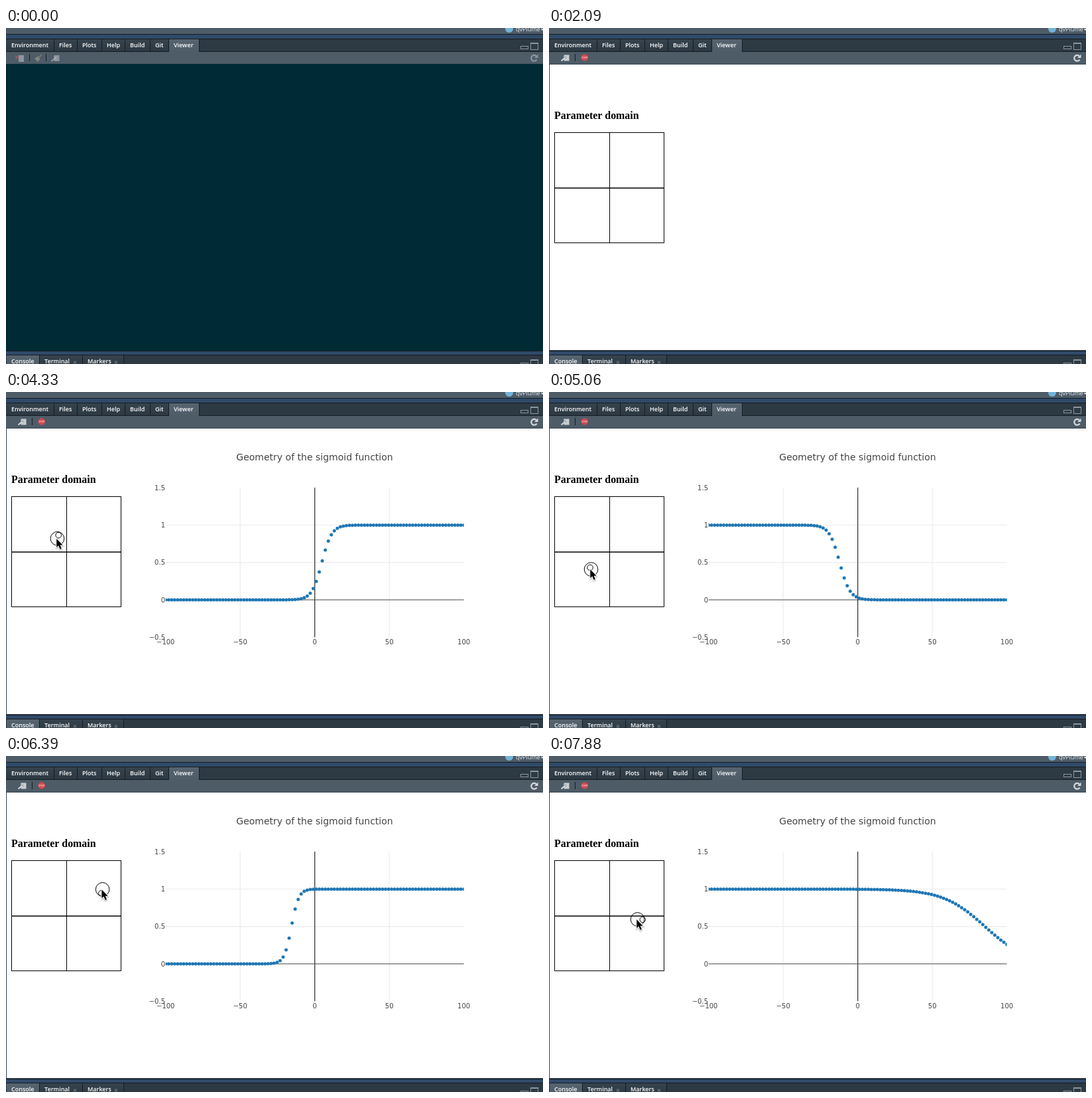
An HTML page with a canvas for the animation above (8000 ms loop, 810 by 506 pixels).

```html
<!DOCTYPE html>
<html lang="en">
<head>
<meta charset="utf-8">
<title>Sigmoid viewer</title>
<style>
html, body { margin: 0; width: 100%; height: 100%; overflow: hidden; background: #002b36; }
canvas { display: block; width: 810px; height: 506px; }
</style>
</head>
<body>
<canvas id="stage" width="810" height="506"></canvas>
<script>
const ctx = document.getElementById('stage').getContext('2d');
const LOOP = 8000, LAG = 75;
const UI = '"Open Sans", "Noto Sans", sans-serif';
const CHART = '"DejaVu Sans", sans-serif';
const BAR = '#4e5c68', STRIP = '#2d3943', FRAME = '#304a69', EDGE = '#141c23';
const INK = '#444', ICON = '#8b969f', BRIGHT = '#d5dadd';

// Turning points of the pointer: time, x, y
const route = [
  [2680, 88.5, 478], [3130, 80.5, 212], [4200, 80.5, 212],
  [4985, 62, 264.4], [5060, 63.5, 267], [5360, 88, 278],
  [5865, 130.2, 244.8], [5940, 135.5, 235], [6540, 149, 189.5],
  [7055, 158.2, 214.3], [7130, 162.5, 218], [7400, 168, 238],
  [7805, 141.3, 246.4], [7880, 133.5, 246]
];

function pointer(t) {
  const i = Math.max(1, route.findIndex(p => p[0] >= t));
  const [t0, x0, y0] = route[i - 1], [t1, x1, y1] = route[i];
  const k = (t - t0) / (t1 - t0);
  return { x: x0 + (x1 - x0) * k, y: y0 + (y1 - y0) * k };
}

// The screen refreshes every 150 ms, now and then 10 ms sooner
const tick = n => 4330 + 150 * n - 10 * (Math.min(4, Math.floor((n + 1) / 3)) + (n > 17));

function snap(t) {
  if (t < 4330) return Math.min(3130, 2680 + 150 * Math.floor((t - 2680) / 150));
  let n = 24;
  while (tick(n) > t) n--;
  return tick(n);
}

function rect(x, y, w, h, color) {
  ctx.fillStyle = color;
  ctx.fillRect(x, y, w, h);
}

function box(x, y, w, h, color) {
  ctx.strokeStyle = color;
  ctx.lineWidth = 1;
  ctx.strokeRect(x + .5, y + .5, w - 1, h - 1);
}

function line(x1, y1, x2, y2, color, width = 1) {
  ctx.strokeStyle = color;
  ctx.lineWidth = width;
  ctx.beginPath();
  ctx.moveTo(x1, y1);
  ctx.lineTo(x2, y2);
  ctx.stroke();
}

function cross(x, y, r, color, width) {
  line(x - r, y - r, x + r, y + r, color, width);
  line(x - r, y + r, x + r, y - r, color, width);
}

function text(str, x, y, font, color, align = 'left') {
  ctx.font = font;
  ctx.fillStyle = color;
  ctx.textAlign = align;
  ctx.fillText(str, x, y);
}

function trace(points) {
  ctx.beginPath();
  points.forEach(([x, y]) => ctx.lineTo(x, y));
  ctx.closePath();
}

function poly(points, color) {
  trace(points);
  ctx.fillStyle = color;
  ctx.fill();
}

function disc(x, y, r, color) {
  ctx.beginPath();
  ctx.arc(x, y, r, 0, 7);
  ctx.fillStyle = color;
  ctx.fill();
}

function arc(x, y, r, from, to, color, width = 1) {
  ctx.beginPath();
  ctx.arc(x, y, r, from, to);
  ctx.strokeStyle = color;
  ctx.lineWidth = width;
  ctx.stroke();
}

function tabs(labels, active, y, closable) {
  const font = '600 9px ' + UI;
  let x = 1;
  for (const label of labels) {
    const on = label === active, close = closable && !on;
    ctx.font = font;
    const end = x + ctx.measureText(label).width + (close ? 26.6 : 15.6);
    const left = Math.round(x), right = Math.round(end) - 1;
    const shade = ctx.createLinearGradient(0, y, 0, y + 19);
    shade.addColorStop(0, on ? '#566470' : '#36434d');
    shade.addColorStop(1, on ? BAR : '#2c3842');
    rect(left, y, right - left, on ? 20 : 18, shade);
    line(right + .5, y, right + .5, y + 19, EDGE);
    text(label, left + 7, y + 12, font, '#fff');
    if (close) cross(right - 11, y + 10.5, 2, '#66717a', 1.3);
    x = end;
  }
}

function paneButtons(y) {
  box(776, y + 5, 12, 5, ICON);
  box(791, y, 12, 11, ICON);
  rect(791, y, 12, 2, ICON);
}

function popOut(x, y, alpha) {
  ctx.globalAlpha = alpha;
  rect(x + 4, y, 8, 9, '#c9ced2');
  line(x, y + 9, x + 6, y + 4, BRIGHT, 2);
  poly([[x + 3, y + 2], [x + 8, y + 2], [x + 8, y + 7]], '#aab2b8');
  ctx.globalAlpha = 1;
}

function refresh(color) {
  arc(796.7, 45.3, 4.4, .5, 5.5, color, 2.2);
  poly([[802.5, 39.5], [802.5, 45], [797, 45]], color);
}

function idleTools() {
  rect(19, 41, 8, 10, ICON);
  cross(16.5, 44, 2.2, '#a05b5d', 1.6);
  line(35.5, 39, 35.5, 50, EDGE);
  line(49, 45, 53.5, 40.5, '#80766b', 1.8);
  poly([[43, 46], [48, 42.5], [51.5, 47], [48, 51]], '#7f867d');
  line(60.5, 39, 60.5, 50, EDGE);
  popOut(68.5, 41, .5);
  refresh(ICON);
}

function liveTools() {
  popOut(18.5, 40.5, 1);
  line(39.5, 39, 39.5, 50, EDGE);
  const corner = (_, i) => {
    const a = (i + .5) * Math.PI / 4;
    return [53.8 + 5.5 * Math.cos(a), 44.5 + 5.5 * Math.sin(a)];
  };
  poly(Array.from({ length: 8 }, corner), '#cf4a50');
  text('STOP', 53.8, 45.8, '700 3.5px ' + UI, '#f3c9ca', 'center');
  refresh(BRIGHT);
}

function shell(live) {
  rect(0, 0, 810, 506, FRAME);
  rect(0, 0, 810, 9, BAR);
  line(0, 9.5, 810, 9.5, EDGE);
  disc(759, 1, 6, '#75b3d8');
  text('qvPlume', 769, 5, '500 9px ' + UI, '#e8ebed');
  poly([[806.5, 1], [811.5, 1], [809, 4]], BRIGHT);

  rect(0, 16, 810, 20, STRIP);
  line(0, 16.5, 810, 16.5, EDGE);
  line(0, 35.5, 810, 35.5, EDGE);
  rect(0, 36, 810, 18, BAR);
  tabs(['Environment', 'Files', 'Plots', 'Help', 'Build', 'Git', 'Viewer'], 'Viewer', 17);
  paneButtons(22);
  rect(0, 54, 810, 432, live ? '#34424d' : '#002b36');
  if (live) rect(1, 55, 809, 430, '#fff');
  line(0, 486.5, 810, 486.5, EDGE);

  rect(0, 492, 810, 14, STRIP);
  line(0, 492.5, 810, 492.5, EDGE);
  tabs(['Console', 'Terminal', 'Markers'], 'Console', 493, true);
  paneButtons(499);
  live ? liveTools() : idleTools();
}

function domain() {
  text('Parameter domain', 8, 137, '700 15.9px "Liberation Serif", serif', '#000');
  box(8, 157, 166, 167, '#000');
  line(91.5, 157, 91.5, 324, '#000');
  line(8, 241, 174, 241, '#000', 1.6);
}

const px = v => 465.7 + 2.2495 * v;
const py = v => 313 - 112.6 * v;
const label = v => String(v).replace('-', '\u2212');

function chart(p) {
  const shift = (p.x - 91) * .1205, slope = (240.5 - p.y) * .01205;
  const font = '10px ' + CHART;
  text('Geometry of the sigmoid function', 465.5, 102.5, '14px ' + CHART, INK, 'center');
  for (const v of [-50, 50]) line(px(v), py(1.5), px(v), py(-.5), '#eee', 1.4);
  for (const v of [.5, 1]) line(px(-100), py(v), px(100), py(v), '#eee', 1.4);
  line(px(-100), py(0), px(100), py(0), INK, 1.2);
  line(px(0), py(1.5), px(0), py(-.5), INK, 1.4);

  ctx.save();
  ctx.beginPath();
  ctx.rect(px(-100), py(1.5), px(100) - px(-100), py(-.5) - py(1.5));
  ctx.clip();
  for (let i = 0; i < 100; i++) {
    const v = -100 + 200 * i / 99;
    disc(px(v), py(1 / (1 + Math.exp(-shift - slope * v))), 2.5, '#1f77b4');
  }
  ctx.restore();

  for (let v = -.5; v <= 1.5; v += .5) text(label(v), 240, py(v) + 3.7, font, INK, 'right');
  for (let v = -100; v <= 100; v += 50) text(label(v), px(v), 380.3, font, INK, 'center');
}

function cursor(x, y) {
  ctx.save();
  ctx.translate(x, y);
  trace([[0, 0], [0, 13], [3, 10.3], [5.3, 15.8], [7.6, 14.8], [5.3, 9.5], [9.3, 9.5]]);
  ctx.shadowColor = 'rgba(0,0,0,.4)';
  ctx.shadowBlur = 2;
  ctx.shadowOffsetY = 1;
  ctx.strokeStyle = '#fff';
  ctx.lineWidth = 2;
  ctx.stroke();
  ctx.shadowColor = 'transparent';
  ctx.fillStyle = '#000';
  ctx.fill();
  ctx.restore();
}

function draw(now) {
  const t = now % LOOP;
  shell(t >= 1490);
  if (t >= 2090) domain();
  if (t >= 2680) {
    const s = snap(t), p = pointer(s);
    const tail = t < 4330 ? p : pointer(s - LAG);
    if (t >= 3730) chart(tail);
    if (t >= 3580) {
      arc(p.x, p.y, 10.3, 0, 7, '#000');
      arc(tail.x, tail.y, 4.3, 0, 7, '#000');
    }
    cursor(p.x - 1.2, p.y + .3);
  }
  requestAnimationFrame(draw);
}
requestAnimationFrame(draw);
</script>
</body>
</html>
```
